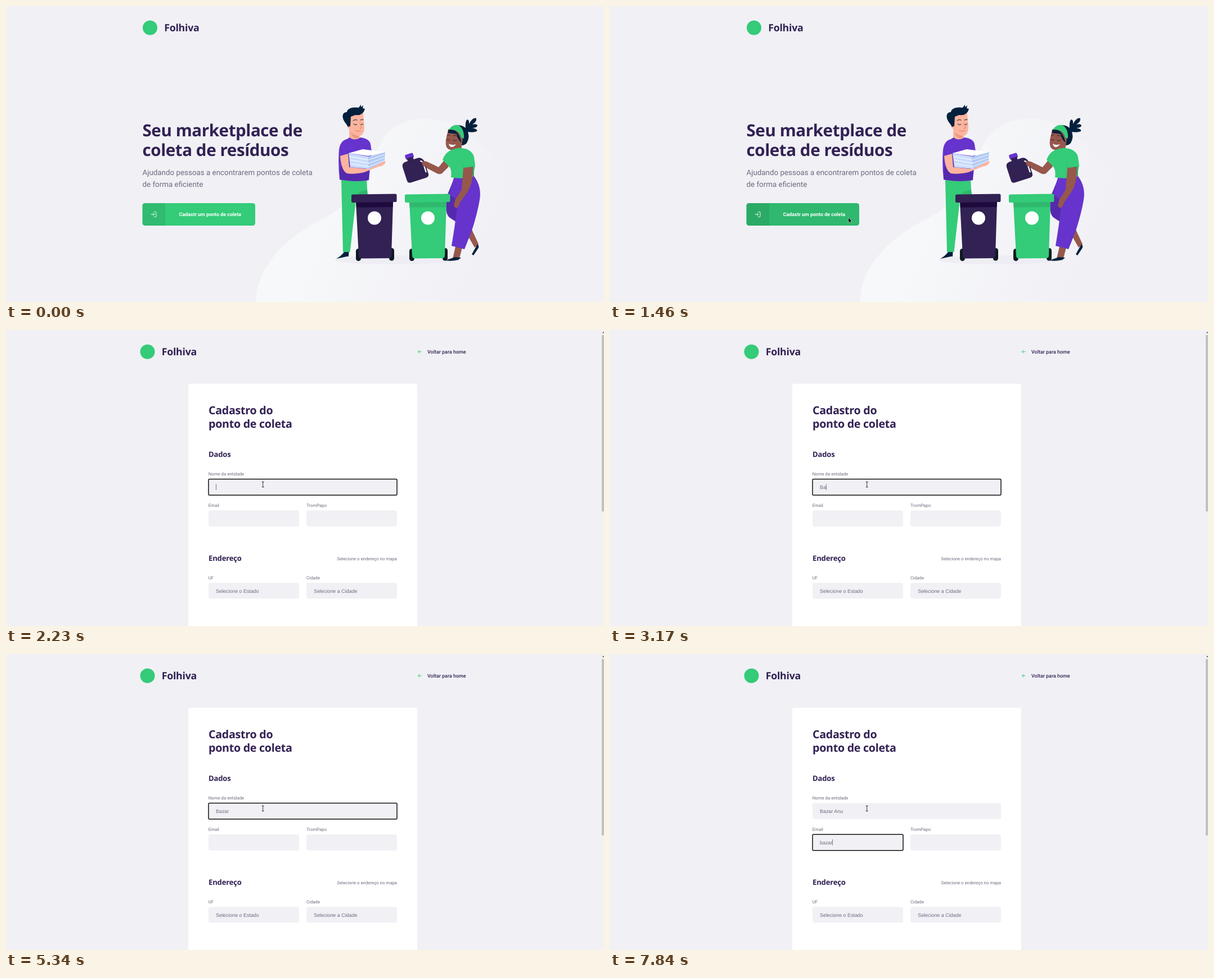
An HTML page for the animation above (8 s loop, 1063 by 527 pixels).

```html
<!DOCTYPE html>
<html lang="pt-BR">
<head>
<meta charset="utf-8">
<title>Cadastro de coleta</title>
<style>
  html, body { margin: 0; width: 100%; height: 100%; overflow: hidden; background: #f0f0f5; }
  svg { display: block; width: 1063px; height: 527px; }
  text { font-family: Roboto, sans-serif; fill: #6c6c80; white-space: pre; text-rendering: geometricPrecision; }
  .head { font-family: "Noto Sans", "Open Sans", sans-serif; font-weight: 700; fill: #322153; letter-spacing: -.015em; }
  .brand { font-size: 17.8px; }
  .hero { font-size: 29.6px; }
  .lead { font-size: 13.38px; }
  .title { font-size: 19.7px; }
  .section { font-size: 13.1px; }
  .label { font-size: 7.8px; }
  .back { font-size: 8.92px; font-weight: 500; fill: #322153; }
  .action { font-size: 8.92px; font-weight: 700; fill: #fff; text-anchor: middle; }
  .value { font-family: "Liberation Sans", Arial, sans-serif; font-size: 8.92px; }
  .field { fill: #f0f0f5; }
  .field.focus { stroke: #101010; stroke-width: 1.5; }
  #button { fill: #34cb79; }
  #button.hover { fill: #2fb86e; }
  .line { fill: none; stroke-linecap: round; stroke-linejoin: round; }
  .skin { fill: #fdb49e; } .brown { fill: #96584c; } .navy { fill: #03203c; }
  .green { fill: #34cb79; } .shade { fill: #2fb86e; }
  .purple { fill: #6633cc; } .dusk { fill: #5529ae; } .plum { fill: #322153; }
</style>
</head>
<body>
<svg viewBox="0 0 1063 527">
  <defs>
    <linearGradient id="glow" gradientUnits="userSpaceOnUse" x1="560" y1="380" x2="850" y2="500">
      <stop offset="0" stop-color="#f7f8fa"/>
      <stop offset="1" stop-color="#f0f0f5"/>
    </linearGradient>
    <g id="brand">
      <circle class="green" cx="256" cy="38.7" r="13"/>
      <text class="head brand" x="281.2" y="45.2">Folhiva</text>
    </g>
    <g id="bin">
      <rect x="622" y="432" width="9" height="22" rx="4.5" fill="#0d1b22"/>
      <rect x="681" y="431" width="9" height="22.5" rx="4.5" fill="#0d1b22"/>
      <path d="M622 349H688L685 445Q684.500 449 680.500 449L631 449.500Q627.500 449 627 445Z"/>
      <path d="M616.500 335.500L692 334.500Q694.500 334.500 694.500 337V346.500Q694.500 349 692 349L616.500 350Q614 350 614 347.500V338Q614 335.500 616.500 335.500Z"/>
      <circle cx="655" cy="377.500" r="12" fill="#fff"/>
    </g>
  </defs>
  <rect width="1063" height="527" fill="#f0f0f5"/>

  <g id="home">
    <path fill="url(#glow)" d="M444 527C446 455 510 405 570 375C627 346 640 284 668 240C693 198 755 190 800 214C872 256 932 330 933 390C934 445 905 490 860 527Z"/>
    <use href="#brand"/>
    <text class="head hero" x="242.500" y="231.700">Seu marketplace de</text>
    <text class="head hero" x="242.500" y="266.500">coleta de resíduos</text>
    <text class="lead" x="242.500" y="301">Ajudando pessoas a encontrarem pontos de coleta</text>
    <text class="lead" x="242.500" y="322.300">de forma eficiente</text>

    <rect id="button" x="242.500" y="351" width="200.500" height="40" rx="4.500"/>
    <path d="M247 351H283V391H247Q242.500 391 242.500 386.500V355.500Q242.500 351 247 351Z" fill-opacity=".08"/>
    <path class="line" stroke="#fff" stroke-width=".9" d="M263.500 366.500H266Q267 366.500 267 367.500V374.500Q267 375.500 266 375.500H263.500M261.500 368.700L263.800 371L261.500 373.300M263.800 371H258"/>
    <text class="action" x="362.800" y="374">Cadastr um ponto de coleta</text>

    <ellipse cx="692" cy="452" rx="108" ry="8" fill="#ededf3"/>

    <g id="man">
      <path class="green" d="M596 308L641 307L643 345H622L611.500 438H599Z"/>
      <path class="shade" d="M628 331L642 327L643 336H624Z"/>
      <path class="navy" d="M587 450Q596 445 601 438H609.500L609 446L606 446Z"/>
      <path class="skin" d="M610 214L629 222V238Q617 242 610 236Z"/>
      <path fill="#e99a85" d="M612 224Q620 231 628 231L624 236Q615 235 612 224Z"/>
      <path class="skin" d="M609 194Q622 189 635 191L637 215Q637 230 628 231Q617 230 612 219Q605 218 606 210Z"/>
      <path class="navy" d="M604 209C596 199 597 189 606 189C606 182 617 179 627 181L631 175.500V180L635 177L634 182L638 183Q635 196 621 194L613 197L612 214L608 215Z"/>
      <path class="line" stroke="#03203c" d="M617 204Q620 201 624 203M630 203L635 202M618 210Q621 213 624 211M631 211Q633 212 635 210"/>
      <path class="line" stroke="#d87e6c" d="M629 208L632 217L629 218M621 222Q626 224 631 222"/>
      <path class="purple" d="M606 237L611 234Q619 241 630 234Q646 236 648 246L650 259L645 310Q620 314 593 309Q590 281 592 256Q594 240 606 237Z"/>
      <path class="dusk" d="M609 266L610 289L645 291V310Q620 314 593 309L594 288Z"/>
      <path class="skin" d="M594 267L608 263L610 287L640 290L668 275Q676 274 674 280Q671 285 662 286L637 296Q619 300 606 298Q596 293 594 267Z"/>
      <path fill="#c9dcfb" d="M609 262L644 268L646 290L612 287Z"/>
      <path fill="#b3cbf3" d="M644 268L674 260L673 276L646 290Z"/>
      <path fill="#fff" d="M609 262L634 255L674 260L644 267Z"/>
      <path class="line" stroke="#eef4ff" stroke-width="1.300" d="M611 268L644 274L672 265M612 274L645 280L673 270M613 281L645 286L673 275"/>
    </g>

    <g id="woman">
      <path class="brown" d="M817 402L827 396L840 424L833 430Z"/>
      <path class="navy" d="M838 424Q842 427 839 432L831 444L828 442Z"/>
      <path class="brown" d="M799 428L811 430L806 449L794 450Z"/>
      <path class="navy" d="M781 453L798 447L809 448L804 452Q792 455 781 453Z"/>
      <path class="dusk" d="M796 308L783 340Q779 370 789 377L812 392L826 400L820 320Z"/>
      <path class="purple" d="M796 306L832 303Q846 322 842 345Q838 369 828 400L815 433L792 427Q800 379 803 347L788 335Z"/>
      <path class="navy" d="M817 220Q816 204 820 202Q824 203 823 210Q830 197 836 200Q837 206 829 211Q837 209 838 213Q837 217 829 217Q839 219 837 223Q831 226 821 224Z"/>
      <path class="navy" d="M796 215Q808 208 819 219Q826 232 819 244Q813 250 807 247L801 225Z"/>
      <path class="brown" d="M786 220Q797 214 805 224L812 236L809 257Q800 262 790 256Q780 255 782 238Z"/>
      <path class="navy" d="M786 221Q800 216 807 234L810 243Q803 239 801 228L786 226Z"/>
      <path class="green" d="M787 220Q794 210 804 212Q815 218 814 236L809 234Q806 219 787 220Z"/>
      <path class="line" stroke="#3b1a22" d="M784 231Q786 228 789 230M795 231Q799 229 802 232M784 238Q787 240 789 238M795 239Q798 241 801 239"/>
      <path fill="#fff" d="M787 245Q793 249 800 246Q796 252 791 251Q788 250 787 245Z"/>
      <path class="brown" d="M781 272L787 286L775 298Q770 301 764 297L743 286L740 279Q742 275 748 277L769 287Z"/>
      <path class="green" d="M790 257Q802 252 810 253Q829 255 832 269L834 284L830 304Q810 309 791 305Q793 291 787 285L776 274Q780 262 790 257Z"/>
      <path class="shade" d="M811 270L814 289L832 287V303L826 305Q814 306 811 270Z"/>
      <path class="brown" d="M813 288L830 286Q831 313 821 330L807 350Q805 357 800 360L796 355L799 344L810 327Z"/>
      <path class="line" stroke="#70372f" d="M814 287L830 286"/>
      <path class="green" d="M811 269Q812 280 814 288L831 286L831 267Z"/>
      <g transform="rotate(-18 727 290)">
        <rect class="purple" x="717" y="261" width="15" height="9" rx="2.500"/>
        <rect class="plum" x="719" y="268" width="11" height="7"/>
        <path class="plum" d="M714 273H738Q745 274 747 282V305Q747 311 741 311H713Q707 311 707 305V281Q707 274 714 273Z"/>
        <path class="line" stroke="#f7f7fa" stroke-width="2.400" d="M741 280Q744 281 744 286V301"/>
      </g>
      <path class="brown" d="M740 276L748 278L751 284L743 286Q738 282 740 276Z"/>
    </g>

    <use href="#bin" class="plum"/>
    <path fill="#1e0a3c" d="M622.300 350L688 349L687.600 358L622.800 358.500Z"/>
    <use href="#bin" x="95" class="green"/>
    <path class="shade" d="M717.300 350L783 349L782.600 358L717.800 358.500Z"/>
    <path class="brown" d="M800 345L807 349Q805 357 801 360L796 356Z"/>
  </g>

  <g id="form">
    <use href="#brand" x="-4.500"/>
    <path class="line" stroke="#34cb79" d="M738 38.700H732.500M735 36.200L732.500 38.700L735 41.200"/>
    <text class="back" x="749" y="41.800">Voltar para home</text>
    <path fill="#fff" d="M328.500 95.500H726.500Q731 95.500 731 100V527H324V100Q324 95.500 328.500 95.500Z"/>
    <text class="head title" x="360" y="150">Cadastro do</text>
    <text class="head title" x="360" y="173.500">ponto de coleta</text>
    <text class="head section" x="360" y="225.600">Dados</text>
    <text class="label" x="359.700" y="258.900">Nome da entidade</text>
    <text class="label" x="359.700" y="314.600">Email</text>
    <text class="label" x="534" y="314.600">TromPapo</text>
    <rect id="nameField" class="field" x="360" y="265.500" width="335" height="28.500" rx="4"/>
    <rect id="mailField" class="field" x="360" y="321.200" width="161" height="28.500" rx="4"/>
    <rect class="field" x="534" y="321.200" width="161" height="28.500" rx="4"/>
    <text id="nameText" class="value" x="373" y="282.900"></text>
    <text id="mailText" class="value" x="373" y="338.600"></text>
    <rect id="caret" width=".7" height="10.500" fill="#444455"/>
    <text class="head section" x="360" y="411">Endereço</text>
    <text class="label" x="695" y="409.500" text-anchor="end">Selecione o endereço no mapa</text>
    <text class="label" x="359.700" y="443.900">UF</text>
    <text class="label" x="534" y="443.900">Cidade</text>
    <rect class="field" x="360" y="450.300" width="161" height="28" rx="4"/>
    <rect class="field" x="534" y="450.300" width="161" height="28" rx="4"/>
    <text class="value" x="373" y="467.500">Selecione o Estado</text>
    <text class="value" x="547.200" y="467.500">Selecione a Cidade</text>
    <rect x="1058" width="5" height="527" fill="#f1f1f1"/>
    <path d="M1059.800 5.500L1062 3L1063 4V5.500Z" fill="#606060"/>
    <rect id="thumb" x="1059" y="9" width="4" fill="#c1c1c1"/>
  </g>

  <path id="arrow" fill="#000" stroke="#fff" stroke-width=".5" d="M0 0V9L2 7.200L3.500 10.400L5 9.700L3.600 6.600H6.300Z"/>
  <path id="beam" class="line" stroke="#222" stroke-width=".9" d="M-1.600 -4.600H1.600M0 -4.600V4.600M-1.600 4.600H1.600"/>
</svg>
<script>
  const LOOP = 8000;
  const $ = id => document.getElementById(id);
  const show = (id, on) => $(id).setAttribute('display', on ? 'inline' : 'none');
  const current = (rows, t) => rows.filter(row => row[0] <= t).pop();

  // time, x, y
  const pointer = [
    [0, -50, -50], [190, 983, 504], [270, 940, 492], [350, 866, 470], [430, 778, 446],
    [510, 690, 424], [580, 612, 405], [660, 550, 391], [740, 503, 381], [820, 472, 374],
    [900, 456.300, 370], [970, 440, 374.500], [1050, 420.500, 378.500], [1130, 423.800, 376.700],
    [1680, 425, 374], [1760, 430, 358], [1840, 438, 332], [1930, 447, 304],
    [2010, 454, 283], [2090, 456.700, 275]
  ];
  // time, name, caret on
  const nameTyping = [
    [0, '', 0], [2230, '', 1], [2850, 'B', 1], [3170, 'Ba', 1], [3250, 'Baz', 1],
    [3330, 'Baza', 1], [3480, 'Bazar', 1], [3790, 'Bazar ', 1], [4320, 'Bazar ', 0],
    [4870, 'Bazar ', 1], [5340, 'Bazar ', 0], [5500, 'Bazar A', 1], [5800, 'Bazar An', 1],
    [6030, 'Bazar Anu', 1]
  ];
  const mailTyping = [
    [0, '', 0], [6430, '', 1], [6980, '', 0], [7300, 'b', 1], [7450, 'ba', 1],
    [7600, 'baz', 1], [7760, 'baza', 1], [7840, 'bazar', 1]
  ];

  function movePointer(t) {
    const [, x, y] = current(pointer, t);
    const overField = t >= 1540 && ((y > 265 && y < 294) || (y > 321 && y < 350));
    show('arrow', !overField);
    show('beam', overField);
    $(overField ? 'beam' : 'arrow').setAttribute('transform', `translate(${x} ${y})`);
  }

  function fillField(name, typing, focused, t) {
    const [, value, caretOn] = current(typing, t);
    const text = $(name + 'Text');
    text.textContent = value;
    $(name + 'Field').classList.toggle('focus', focused);
    $(name + 'Field').setAttribute('rx', focused ? 1.5 : 4);
    if (!focused) return;
    const width = value ? text.getComputedTextLength() : 0;
    $('caret').setAttribute('x', 373 + width);
    $('caret').setAttribute('y', +text.getAttribute('y') - 8.6);
    show('caret', caretOn);
  }

  function draw() {
    const t = performance.now() % LOOP;
    const onForm = t >= 1540;
    show('home', !onForm);
    show('form', onForm);
    $('button').classList.toggle('hover', t >= 970);
    $('thumb').setAttribute('height', t < 1680 ? 407.5 : 314);
    show('caret', false);
    fillField('name', nameTyping, t >= 2230 && t < 6430, t);
    fillField('mail', mailTyping, t >= 6430, t);
    movePointer(t);
    requestAnimationFrame(draw);
  }
  draw();
</script>
</body>
</html>
```
